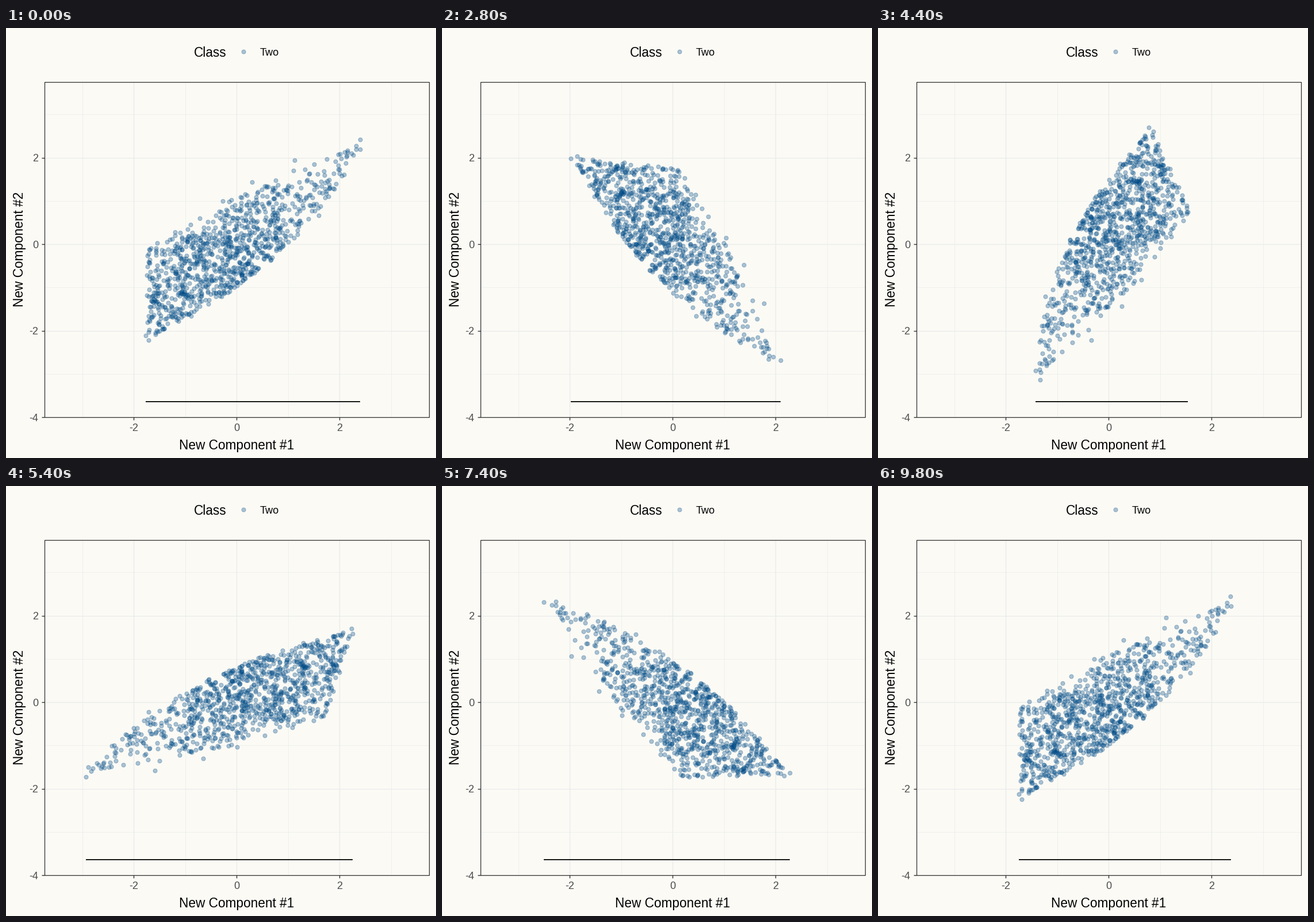
Animation, 748 px wide and 748 px high, one loop 10 s. Source, as a matplotlib script:

```python
import numpy as np
import matplotlib
import matplotlib.pyplot as plt
from matplotlib.animation import FuncAnimation

SIZE, DPI = 748, 100
PX = 72 / DPI                      # points per pixel
FRAMES, INTERVAL = 50, 200
BG, INK, GRID, GREY, BLUE = "#FBFAF5", "#333333", "#EBEBEB", "#4D4D4D", "#004B87"
LEFT, RIGHT, TOP, BOTTOM = 67, 736, 93.5, 677
X0, Y0, SX, SY = 401.4, 376, 89.5, 75.25
BASE_Y = 650
TITLE, TEXT = 22.67, 18.13

STEP = np.radians(359.45 / 59)
TILT = 8 * STEP                    # turn that lays the cloud's long axis flat

# Outermost points of the cloud, with its long axis flat.
CORNERS = [(3.4, -0.2), (3.24, -0.25), (-2.8, -0.18), (-2.75, -0.06),
           (-1.22, 1.2), (-1.0, 1.18), (0.57, 0.87), (1.27, 0.72),
           (2.2, 0.43), (1.55, -0.76)]

matplotlib.rcParams["font.family"] = "Liberation Sans"


def rotate(points, a):
    """Turn the points clockwise by a."""
    x, y = points.T
    c, s = np.cos(a), np.sin(a)
    return np.column_stack([x * c + y * s, y * c - x * s])


def to_px(points):
    return np.array([X0, Y0]) + np.asarray(points) * [SX, -SY]


def edges(u):
    """Lower and upper edge of the flat cloud at u."""
    low = -0.2 - 0.55 * (1 - ((u - 0.55) / 3.2) ** 2)
    arc = 1.2 - 1.4 * (np.maximum(u + 1.2, 0) / 4.6) ** 1.3
    return low, np.minimum(2.33 + 0.876 * u, arc)


def make_cloud(n):
    rng = np.random.default_rng(8)
    u = np.linspace(-2.75, 3.3, 1000)
    low, high = edges(u)
    thin_out = 1 - 0.45 / (1 + np.exp(-4 * (u - 0.9)))
    mass = np.cumsum((high - low) * thin_out)
    u = np.interp(rng.random(n) * mass[-1], mass, u)
    low, high = edges(u)
    v = low + rng.beta(1.05, 1.3, n) * (high - low)
    return rotate(np.vstack([np.column_stack([u, v]), CORNERS]), -TILT)


CLOUD = make_cloud(990)


def turn(i):
    # After the first nine steps, every fourth step is a double one.
    return STEP * (i + max(0, (i - 6) // 4))


fig = plt.figure(figsize=(SIZE / DPI, SIZE / DPI), dpi=DPI, facecolor=BG)
ax = fig.add_axes([0, 0, 1, 1])
ax.set_xlim(0, SIZE)
ax.set_ylim(SIZE, 0)
ax.axis("off")


def stroke(xs, ys, color, width, z):
    return ax.plot(xs, ys, color=color, lw=width * PX, zorder=z,
                   solid_capstyle="butt")[0]


def label(x, y, s, size, color="black", ha="center", rotation=0):
    ax.text(x, y, s, fontsize=size * PX, color=color, ha=ha, va="baseline",
            rotation=rotation, rotation_mode="anchor")


def dots(points, z=4):
    tint = matplotlib.colors.to_rgba(BLUE, 0.32)
    return ax.scatter(*np.transpose(points), s=(7.1 * PX) ** 2,
                      facecolors=[tint], edgecolors=[tint],
                      linewidths=PX, zorder=z)


# Grid, ticks and tick labels
for v in range(-4, 4):
    gx, gy = to_px((v, v))
    major = v % 2 == 0
    width, z = (1.4, 2) if major else (0.7, 1)
    if v > -4:
        stroke([gx, gx], [TOP, BOTTOM], GRID, width, z)
        stroke([LEFT, RIGHT], [gy, gy], GRID, width, z)
    if major:
        stroke([LEFT - 5, LEFT], [gy, gy], INK, 1.4, 5)
        label(56.5, gy + 6.5, str(v), TEXT, GREY, ha="right")
    if major and v > -4:
        stroke([gx, gx], [BOTTOM, BOTTOM + 5], INK, 1.4, 5)
        label(gx, 701, str(v), TEXT, GREY)

stroke([LEFT, RIGHT, RIGHT, LEFT, LEFT], [TOP, TOP, BOTTOM, BOTTOM, TOP],
       INK, 1.3, 6)

# Titles and legend
label(401, 732.5, "New Component #1", TITLE)
label(30, 384.5, "New Component #2", TITLE, rotation=90)
label(327, 49.5, "Class", TITLE, ha="left")
label(442, 48, "Two", TEXT, ha="left")
dots([(413.3, 41.3)])

cloud = dots(to_px(CLOUD))
span = stroke([0, 0], [BASE_Y, BASE_Y], "black", 1.8, 4)


def update(i):
    points = to_px(rotate(CLOUD, turn(i)))
    cloud.set_offsets(points)
    span.set_xdata([points[:, 0].min(), points[:, 0].max()])
    return cloud, span


anim = FuncAnimation(fig, update, frames=FRAMES, interval=INTERVAL,
                     init_func=lambda: update(0), repeat=True)
plt.show()
```
